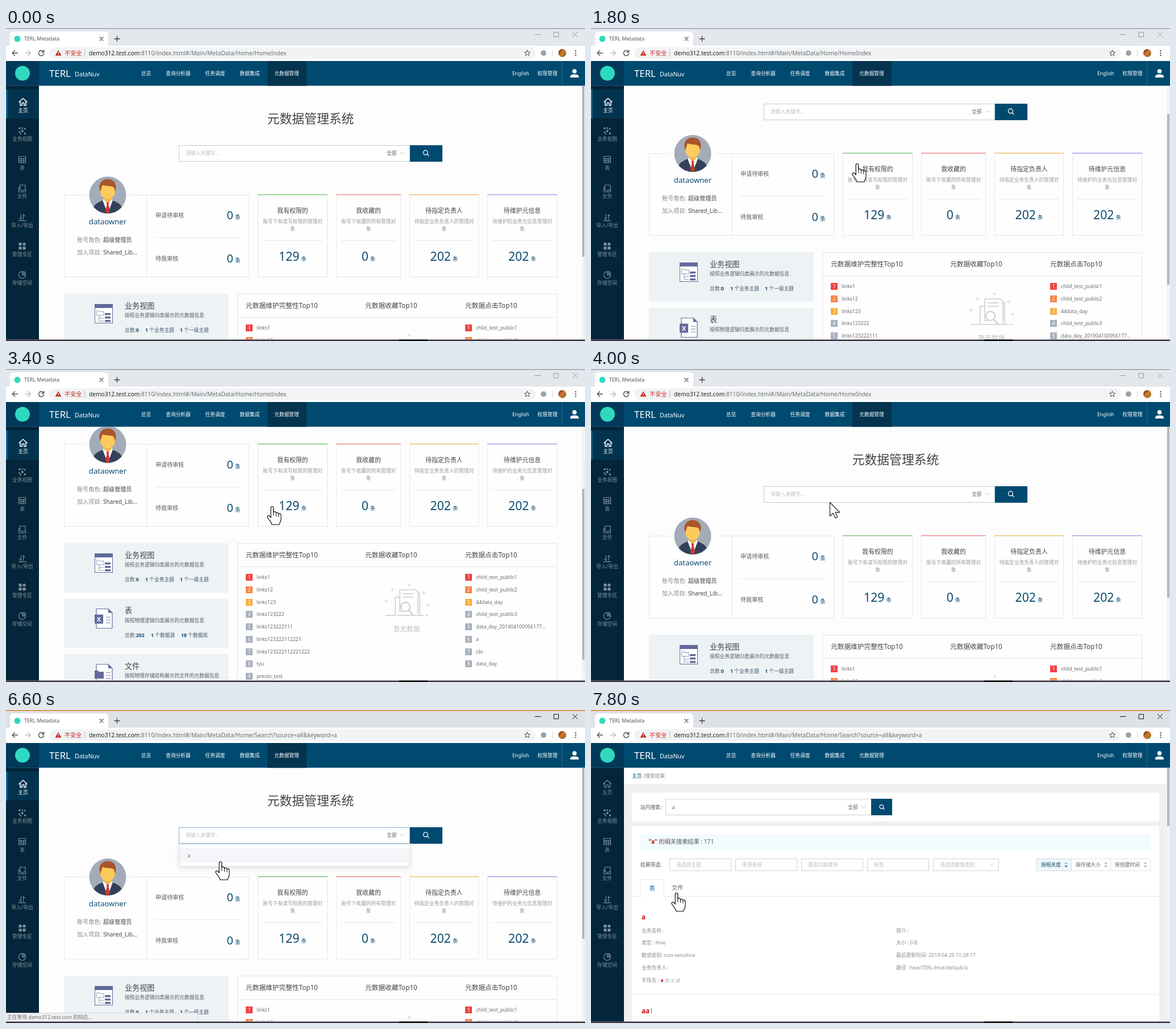
Write an HTML page with a canvas that moves like this. It is 1019x550 px and loops after 8 s.

```html
<!DOCTYPE html>
<html lang="zh-CN">
<head>
<meta charset="utf-8">
<title>Metadata</title>
<style>
html, body { margin: 0; width: 100%; height: 100%; overflow: hidden; background: #fff; }
canvas { display: block; width: 1019px; height: 550px; }
</style>
</head>
<body>
<canvas id="stage"></canvas>
<script>
const W = 1019, H = 550, LOOP = 8000, STEP = 100;
const canvas = document.getElementById('stage');
const ratio = window.devicePixelRatio || 1;
canvas.width = W * ratio;
canvas.height = H * ratio;
const g = canvas.getContext('2d');
g.scale(ratio, ratio);

const NAVY = '#004a70', DEEP = '#0b4a70', BRAND = '#2fd9c0', INK = '#444', GREY = '#999', LINE = '#e8e6e9';
const FONT = '"Noto Sans", "Noto Sans CJK SC", sans-serif';

// ---- drawing helpers ----
function text(s, x, cy, size, color, align = 'left', weight = 400) {
  g.font = `${weight} ${size}px ${FONT}`;
  g.textAlign = align;
  g.fillStyle = color;
  g.fillText(s, x, cy + size * 0.37);
  return x + g.measureText(s).width;
}
function runs(x, cy, size, parts) {
  for (const [s, color, weight] of parts) x = text(s, x, cy, size, color, 'left', weight);
}
function fill(x, y, w, h, color) {
  g.fillStyle = color;
  g.fillRect(x, y, w, h);
}
function frame(x, y, w, h, color, back) {
  if (back) fill(x, y, w, h, back);
  g.strokeStyle = color;
  g.lineWidth = 1;
  g.strokeRect(x + 0.5, y + 0.5, w - 1, h - 1);
}
function rounded(x, y, w, h, r, color) {
  g.beginPath();
  g.roundRect(x, y, w, h, r);
  g.fillStyle = color;
  g.fill();
}
function disc(x, y, r, color) {
  g.beginPath();
  g.arc(x, y, r, 0, Math.PI * 2);
  g.fillStyle = color;
  g.fill();
}
function icon(d, x, y, { stroke, back, width = 1 }) {
  const p = new Path2D(d);
  g.save();
  g.translate(x, y);
  g.lineJoin = g.lineCap = 'round';
  if (back) { g.fillStyle = back; g.fill(p); }
  if (stroke) { g.strokeStyle = stroke; g.lineWidth = width; g.stroke(p); }
  g.restore();
}
const chevron = (x, y) => icon('M-3.5-1.8L0 1.8L3.5-1.8', x, y, { stroke: '#c0c4cc' });
const lens = (x, y, s) => icon(`M${s} 0A${s} ${s} 0 1 1 ${-s} 0A${s} ${s} 0 1 1 ${s} 0M${s * 0.7} ${s * 0.7}L${s * 1.4} ${s * 1.4}`,
  x - 0.6, y - 0.6, { stroke: '#fff', width: 1.2 });

// ---- motion ----
const clamp = v => Math.max(0, Math.min(1, v));
const ramp = (t, a, b) => clamp((t - a) / (b - a));
const smooth = v => v * v * (3 - 2 * v);

const MOVES = [
  [200, 901, 62, 'arrow'], [500, 740, 120, 'arrow'], [800, 540, 185, 'arrow'], [1000, 468, 218, 'beam'],
  [1100, 468, 222, 'beam'], [1300, 468, 238, 'arrow'], [1600, 468, 238, 'hand'], [2100, 468, 238, 'hand'],
  [2200, 468, 241, 'hand'], [3900, 468, 241, 'hand'], [4000, 420, 234, 'arrow'], [4200, 360, 218, 'beam'],
  [4400, 312, 246, 'arrow'], [4800, 222, 302, 'arrow'], [4900, 235, 290, 'arrow'], [5200, 324, 218, 'beam'],
  [5500, 324, 218, 'beam'], [5800, 412, 220, 'beam'], [6000, 405, 244, 'hand'], [6200, 377, 266, 'hand'],
  [6700, 377, 266, 'arrow'], [7000, 380, 245, 'arrow'], [7200, 313, 243, 'arrow'], [7400, 228, 268, 'beam'],
  [7500, 193, 293, 'arrow'], [7700, 150, 321, 'hand'], [8000, 150, 321, 'hand']
];
function pointerAt(t) {
  let i = -1;
  while (i + 1 < MOVES.length && MOVES[i + 1][0] <= t) i++;
  if (i < 0) return null;
  const a = MOVES[i], b = MOVES[i + 1] || a;
  const k = b === a ? 0 : ramp(t, a[0], b[0]);
  return { x: a[1] + (b[1] - a[1]) * k, y: a[2] + (b[2] - a[2]) * k, kind: a[3] };
}
const scrollAt = t => Math.round(
  73 * smooth(ramp(t, 1250, 1800)) + 144 * smooth(ramp(t, 2100, 2500)) - 217 * smooth(ramp(t, 3300, 3600)));

// ---- browser window ----
function browser(active, searching) {
  const btn = active ? '#111' : '#999';
  fill(0, 0, W, 32, active ? '#dee1e6' : '#e4e7eb');
  fill(0, 0, W, 1.5, active ? '#d98227' : '#9aa3ae');
  rounded(7, 6, 173, 30, [6, 6, 0, 0], '#fff');
  fill(0, 31, W, 27, '#fff');
  disc(20, 19, 5.5, BRAND);
  text('TERL Metadata', 32, 19, 8.9, '#50545a');
  icon('M-3-3L3 3M3-3L-3 3', 168, 19, { stroke: '#4a4d51', width: 1.1 });
  icon('M-4.5 0H4.5M0-4.5V4.5', 195.5, 19, { stroke: '#3c4043', width: 1.3 });
  icon('M-5 0H5', 936, 11.5, { stroke: btn });
  icon('M-4-4H4V4H-4Z', 968.5, 11.5, { stroke: btn });
  icon('M-4-4L4 4M4-4L-4 4', 1001.5, 11.5, { stroke: btn });

  const back = 'M5 0H-4.5M0-4.5L-4.5 0L0 4.5';
  icon(back, 15.5, 44, { stroke: '#4b4f54', width: 1.4 });
  icon('M-5 0H4.5M0-4.5L4.5 0L0 4.5', 39, 44, { stroke: '#b9bcc0', width: 1.4 });
  icon('M3.5-3A4.6 4.6 0 1 0 4.6 1M4.6-5V-1.5H1', 62, 44, { stroke: '#4b4f54', width: 1.4 });
  rounded(76, 34, 856, 20, 10, '#f1f3f4');
  icon('M0-5L5.5 4.5H-5.5Z', 92, 44, { back: '#c9281f' });
  fill(91.5, 42, 1.2, 3.2, '#fff');
  fill(91.5, 46, 1.2, 1.2, '#fff');
  text('不安全', 103, 44, 10.2, '#c9281f');
  fill(138, 38, 1, 12, '#b5b9be');
  const page = searching ? 'Search?source=all&keyword=a' : 'HomeIndex';
  runs(146, 44, 10.2, [['demo312.test.com', '#202124'], [':8110/index.html#/Main/MetaData/Home/' + page, '#6a6e73']]);
  icon('M0-5L1.5-1.7L5-1.4L2.3.9L3.1 4.4L0 2.5L-3.1 4.4L-2.3.9L-5-1.4L-1.5-1.7Z', 917.5, 44, { stroke: '#4b4f54' });
  disc(946, 44, 4.8, '#9aa0a4');
  fill(961, 38, 1, 12, '#cdd0d4');
  const photo = g.createLinearGradient(972, 38, 986, 51);
  photo.addColorStop(0, '#3d2c1c');
  photo.addColorStop(0.45, '#e0742a');
  photo.addColorStop(1, '#4a7a32');
  disc(979, 44, 7, photo);
  for (const d of [-4, 0, 4]) disc(1002.5, 44 + d, 1.2, '#4b4f54');
}
function desktopEdge() {
  fill(0, 547.5, W, 2.5, '#39323f');
  fill(692, 547.5, 50, 2.5, '#0a0a0c');
}

// ---- application shell ----
const MENU = [
  ['主页', 'M-7 0L0-6.5L7 0M-5-1.5V6H-1.8V1.5H1.8V6H5V-1.5'],
  ['业务视图', 'M-6-6h3v3h-3zM-1-6h2.4v2.4h-2.4zM3.4-5h2.6v2.6h-2.6zM-1.5-1.5h3.5v3.5h-3.5zM-6 1h2.5v2.5h-2.5zM-4 4h2.5v2h-2.5zM3.4 3h3v3h-3z', 1],
  ['表', 'M-6-5.5H6V5.5H-6ZM-6-1.7H6M-6 2H6M-2-1.7V5.5M2-1.7V5.5'],
  ['文件', 'M-4-6H5.5V2.5H2.5L1.5 4H-.5L-1.5 2.5H-4ZM-4-2H-6V6H6V2.5'],
  ['导入/导出', 'M-2-5V4L-5 1M2 4V-5L5-2M-6.5 6H6.5'],
  ['管理专区', 'M-6-6h5v5h-5zM-6 1h5v5h-5zM1 1h5v5h-5zM3.5-6.8L6.8-3.5L3.5-.2L.2-3.5Z', 1],
  ['存储空间', 'M6 0A6 6 0 1 1 0-6V0ZM2-6A5 5 0 0 1 6-2H2Z']
];
function shell(home) {
  fill(0, 58, W, 43.5, NAVY);
  fill(0, 58, 58, 43.5, '#02395a');
  disc(29, 79.5, 13, BRAND);
  text('TERL', 76, 79.5, 16.8, '#fff');
  text('DataNuv', 121, 81.5, 10.6, '#fff');
  if (home) fill(460, 58, 69, 43.5, '#04344e');
  [['总览', 246.5], ['查询分析器', 303], ['任务调度', 368], ['数据集成', 429], ['元数据管理', 494]]
    .forEach(([s, x]) => text(s, x, 80, 8.75, '#fff', 'center', 500));
  text('English', 891, 80, 8.75, '#fff');
  text('权限管理', 935.5, 80, 8.75, '#fff', 'left', 500);
  fill(978, 58, 1, 43.5, '#2b6788');
  disc(1000.5, 76, 3.8, '#fff');
  icon('M-7.5 7V5.5C-7.5 2-3 1.5 0 1.5S7.5 2 7.5 5.5V7Z', 1000.5, 80, { back: '#fff' });

  fill(0, 101.5, 58, 446, '#04263a');
  if (home) {
    fill(0, 108, 58, 51, '#03344f');
    fill(0, 108, 2.5, 51, '#0b6d9f');
  }
  MENU.forEach(([label, d, solid], i) => {
    const on = home && i === 0, y = 130 + 50.65 * i, c = on ? '#fff' : '#81929d', x = on ? 30 : 28.5;
    icon(d, x, y, solid ? { back: c } : { stroke: c, width: on ? 1.5 : 1.1 });
    text(label, x, y + 14.3, 8.75, c, 'center', on ? 500 : 400);
  });
}
function scrollbar(y, h) {
  fill(1013, 101.5, 6, 446, '#f3f3f3');
  fill(1014, y, 4, h, '#b4b6b8');
}

// ---- home page ----
function portrait(x, y) {
  disc(x, y, 39, '#fdfdfd');
  g.save();
  g.beginPath();
  g.arc(x, y, 32.5, 0, Math.PI * 2);
  g.clip();
  fill(x - 33, y - 33, 66, 66, '#a3abb9');
  icon('M-27 36C-27 18-22 15-8 9H8C22 15 27 18 27 36Z', x, y, { back: '#33425a' });
  icon('M-9 9L0 33L9 9L4 5H-4Z', x, y, { back: '#fff' });
  icon('M-6 0H6V9L0 14L-6 9Z', x, y, { back: '#f0b548' });
  icon('M-2.5 13H2.5L1.5 17L4 28L0 34L-4 28L-1.5 17Z', x, y, { back: '#d4352f' });
  icon('M-13-10C-13-24 13-24 13-10V-6C13 3 5 7 0 7S-13 3-13-6Z', x, y, { back: '#fccb5c' });
  icon('M-13-6C-18-20-10-28 0-28S18-20 13-6L11-13C8-17-6-15-9-18Z', x, y, { back: '#a9552b' });
  g.restore();
}
const STATS = [
  [443, 123, '我有权限的', '账号下有读写权限的管理对', '129', '#8fd08a'],
  [581, 114, '我收藏的', '账号下收藏的所有管理对', '0', '#f29a9a'],
  [710, 122, '待指定负责人', '待指定业务负责人的管理对', '202', '#f3cd7d'],
  [847, 123, '待维护元信息', '待维护的业务元信息管理对', '202', '#b9a9ee']
];
function stat([x, w, title, note, count, color]) {
  const c = x + w / 2;
  frame(x, 293, w, 145, LINE, '#fefefe');
  fill(x, 292, w, 1.6, color);
  text(title, c, 321, 10.9, INK, 'center');
  text(note, c, 340, 8.75, GREY, 'center');
  text('象', c, 352.5, 8.75, GREY, 'center');
  fill(x + 8, 373, w - 16, 1, LINE);
  g.font = `21.2px ${FONT}`;
  const left = c - (g.measureText(count).width + 12.5) / 2;
  const end = text(count, left, 401, 21.2, DEEP);
  text('条', end + 3, 405, 9.5, DEEP);
}
const PAPER = 'M-13-17H8L15-10V17H-13Z';
const GROUPS = [
  ['业务视图', '按照业务逻辑归类展示的元数据信息', [['0', '', 209], ['1', '个业务主题', 245], ['1', '个一级主题', 306]]],
  ['表', '按照物理逻辑归类展示的元数据信息', [['202', '', 209], ['1', '个数据源', 255], ['18', '个数据库', 308]]],
  ['文件', '按照物理存储结构展示的文件的元数据信息', [['0', '', 209], ['0', '个数据源', 245]]]
];
function group([title, note, counts], i) {
  const y = 467 + 97.5 * i, ix = 172, iy = y + 35, c = '#626a9c';
  fill(102, y, 290, 87, '#edf2f5');
  if (i === 0) {
    frame(156, y + 18, 32, 34, c, '#fff');
    fill(156, y + 18, 32, 7, c);
    icon('M-12-5H-7L-6-3.5H0V3H-12ZM-8 3V13H0M-8 8H0', ix, iy, { stroke: '#9097b8' });
    for (const d of [-1, 5, 11]) fill(ix + 2, iy + d, 10, 3.5, c);
  } else {
    icon(PAPER, ix, iy, { stroke: c, back: '#fff', width: 1.2 });
    icon('M8-17V-10H15Z', ix, iy, { back: c });
    for (const d of [-3, 2, 7]) fill(ix + 4, iy + d, 8, 1.2, '#9097b8');
    if (i === 1) {
      fill(156, iy - 7, 15, 16, c);
      text('X', 163.5, iy + 1, 11, '#fff', 'center', 700);
    } else icon('M-16-6H-10L-8-4H0V8H-16Z', ix, iy, { back: c });
  }
  text(title, 209, y + 21, 13.1, INK);
  text(note, 209, y + 38, 8.75, '#565b64');
  counts.forEach(([n, label, x], k) => runs(x, y + 64, 8.75, k
    ? [[n, DEEP, 700], [' ' + label, '#45566a']] : [['总数:', '#565b64'], [n, DEEP, 700]]));
}
const LINKS = ['links1', 'links12', 'links123', 'links123222', 'links123222111', 'links123222112221',
  'links123222112221222', 'tyu', 'presto_test', 'tyu_pro'];
const CLICKS = ['child_test_public1', 'child_test_public2', '44data_day', 'child_test_public3',
  'data_day_201904100956177...', 'a', 'cbr', 'data_day'];
function ranking(items, x) {
  items.forEach((s, i) => {
    const y = 527 + 21.75 * i;
    fill(x, Math.round(y - 6), 12, 12, ['#f24343', '#f78446', '#fbad3c'][i] || '#a6b0be');
    text(i + 1, x + 6, y, 8.2, '#fff', 'center');
    text(s, x + 19, y, 8.75, '#6b6b6b');
  });
}
function emptyNote(x, y) {
  const stroke = '#c9cbce';
  icon('M-37 25H-21M-17 25H30M34 25H37M-20 25V-7H-13M-12 18V-20H16L20-16V22M-8 18H-12M-7-13H12M-7-7H12M20-14H23V24',
    x, y, { stroke, width: 1.5 });
  icon('M6 10A8 8 0 1 1-10 10A8 8 0 1 1 6 10M4 16L11 24', x, y, { stroke, back: '#fff', width: 2 });
  for (const [dx, dy] of [[-36, 0], [-25, -20], [5, -29], [30, -15], [37, 7]]) {
    g.beginPath();
    g.arc(x + dx, y + dy, 1.7, 0, 7);
    g.strokeStyle = stroke;
    g.lineWidth = 1;
    g.stroke();
  }
  text('暂无数据', x, y + 48.5, 11.7, '#bdbfc2', 'center');
}
function suggestions(open) {
  if (!open) return;
  g.save();
  g.globalAlpha = open;
  g.translate(0, 235);
  g.scale(1, 0.5 + open / 2);
  g.shadowColor = 'rgba(0,0,0,.13)';
  g.shadowBlur = 8;
  g.shadowOffsetY = 2;
  fill(305, 1, 406, 39, '#fff');
  g.shadowColor = 'transparent';
  frame(305, 1, 406, 39, '#e4e7ed');
  fill(306, 7, 404, 26, '#f4f6f9');
  text('a', 319.5, 21, 8.75, '#606266');
  g.restore();
}
function homePage(scroll, open) {
  g.save();
  g.beginPath();
  g.rect(58, 101.5, 955, 446);
  g.clip();
  fill(58, 101, 955, 447, '#fdfdfd');
  g.translate(0, -scroll);
  text('元数据管理系统', 536, 158.5, 21.8, INK, 'center');
  frame(304, 206, 407, 29, open ? '#8aaccb' : '#bccddc', '#fff');
  text('请输入关键字...', 316, 220, 8.75, '#b9bdc5');
  text('全部', 670, 220, 8.75, '#606266');
  chevron(697.5, 220);
  fill(711, 206, 57, 29, NAVY);
  lens(739, 219.5, 4);

  frame(102, 293, 326, 145, LINE, '#fefefe');
  fill(247, 293, 1, 144, LINE);
  portrait(179, 293.5);
  text('dataowner', 179, 340, 13.1, DEEP, 'center');
  [['账号角色:', '超级管理员', 372], ['加入项目:', 'Shared_Lib...', 394]].forEach(([k, v, y]) => {
    text(k, 125, y, 10.1, '#8a8a8a');
    text(v, 171, y, 10.1, INK);
  });
  [['申请待审核', 329.5], ['待我审核', 405]].forEach(([s, y]) => {
    text(s, 263, y, 10.1, '#5a5a5a');
    text('0', 388.5, y - 0.5, 20, DEEP);
    text('条', 403, y + 3, 9.8, DEEP);
  });
  fill(263, 368, 150, 1, LINE);
  STATS.forEach(stat);
  GROUPS.forEach(group);

  frame(407, 467, 563, 283, '#e4e4e5', '#fefefe');
  fill(407, 508, 563, 1, '#e4e4e5');
  [['元数据维护完整性', 422], ['元数据收藏', 632], ['元数据点击', 808]]
    .forEach(([s, x]) => text(s + 'Top10', x, 488, 11.7, INK));
  ranking(LINKS, 422);
  ranking(CLICKS, 808);
  emptyNote(705, 569);
  suggestions(open);
  g.restore();
  scrollbar(102 + scroll * 0.675, 300);
}

// ---- search results ----
function resultsPage() {
  const red = '#cc0a0a', hint = '#b9bdc6', edge = '#ccd4de', soft = '#8c8c8c';
  fill(58, 101.5, 955, 446, '#eff0f1');
  fill(58, 101.5, 955, 29, '#fff');
  runs(72, 116, 8.75, [['主页', DEEP], [' /搜索结果', '#8a8a8a']]);
  fill(72, 145, 928, 51, '#fff');
  text('站内搜索:', 87, 170.5, 8.75, '#555');
  frame(131, 156, 363, 29, edge, '#fff');
  text('a', 142.5, 170.5, 8.75, '#606266');
  text('全部', 452, 170.5, 8.75, '#606266');
  chevron(479.5, 170.5);
  fill(493, 156, 37, 29, NAVY);
  lens(512, 170.5, 3.4);

  fill(72, 204, 928, 344, '#fff');
  fill(87, 219, 898, 28, '#f1fafc');
  runs(101.5, 231.5, 10.2, [['"a"', red, 700], [' 的相关搜索结果 : 171', '#555']]);
  text('结果筛选:', 87, 272, 8.75, '#555');
  [['请选择主题', 109], ['来源系统', 109], ['源表功能模块', 109], ['标签', 109], ['请选择敏感类别', 116]].forEach(([s, w], i) => {
    const x = 138 + 116 * i;
    frame(x, 261, w, 22, edge, '#fff');
    text(s, x + 12, 272, 8.75, hint);
  });
  chevron(705.5, 272);

  frame(784, 261, 201, 22, '#dde2e8', '#fff');
  frame(784, 261, 62, 22, '#c7dbe6', '#f0f7fa');
  fill(914, 261, 1, 22, '#dde2e8');
  [['按相关度', 792, 836], ['按存储大小', 853, 906], ['按创建时间', 922, 975.5]].forEach(([s, x, ax], i) => {
    text(s, x, 272, 8.75, i ? '#606266' : DEEP);
    icon('M-3-1.5L0-4.5L3-1.5Z', ax, 272, { back: '#a9adb5' });
    icon('M-3 1.5L0 4.5L3 1.5Z', ax, 272, { back: i ? '#a9adb5' : '#1f7fb0' });
  });

  fill(72, 327, 928, 1, '#e3e6ea');
  icon('M0 30V3Q0 0 3 0H38Q41 0 41 3V30', 87, 298, { stroke: '#e0e4e9', back: '#fff' });
  text('表', 107.5, 313, 10.2, '#0f6a98', 'center');
  text('文件', 152, 312.5, 10.2, '#666', 'center');

  text('a', 89, 363.5, 11.6, red, 'left', 700);
  const rows = [
    ['业务名称 :', '简介 :'],
    ['类型 : Hive', '大小 : 0 B'],
    ['敏感类别: non-sensitive', '最后更新时间: 2019-04-25 11:28:17'],
    ['业务负责人:', '路径 : hive/TERL-Hive/default/a']
  ];
  rows.forEach(([a, b], i) => {
    const y = 387.5 + 21.75 * i;
    text(a, 89, y, 8.75, soft);
    text(b, 537, y, 8.75, soft);
  });
  runs(89, 474.5, 8.75, [['字段名 : ', soft], ['a', red, 700], [' ;b ;c ;d', soft]]);
  fill(72, 499, 928, 1, '#ebedf0');
  runs(89, 528.5, 11.6, [['aa', red, 700], ['1', '#2f80d8']]);
  scrollbar(102, 102);
}
function loading(t) {
  const alpha = 0.9 * (1 - ramp(t, 6790, 7080));
  if (alpha <= 0) return;
  fill(0, 58, 1019, 489.5, `rgba(255,255,255,${alpha})`);
  g.save();
  g.globalAlpha = alpha / 0.9;
  g.beginPath();
  const turn = Math.PI + (t - 7000) / 320;
  g.arc(509.5, 303.5, 14.5, turn - 1.1, turn + 1.1);
  g.strokeStyle = '#9fb0bc';
  g.lineWidth = 1.6;
  g.stroke();
  g.restore();
}
function statusBubble(alpha) {
  if (alpha <= 0) return;
  g.save();
  g.globalAlpha = alpha;
  frame(-1, 532, 339, 17, '#d2d5d9', '#eff0f2');
  text('正在等待 demo312.test.com 的响应...', 2, 540, 8.75, '#6a6d70');
  g.restore();
}

// ---- pointer ----
const POINTERS = {
  arrow: ['M0 0V24L5.6 18.8L9.4 27.4L13.2 25.7L9.5 17.4H17.4Z', 1.1],
  hand: ['M-2.3 2C-2.3-.6 2.3-.6 2.3 2V11C3-.0 0 9 4 9.2C6 9.2 7 10.5 7 12C8 10 11 10.4 11.4 13C13 11.6 15.5 12.5 15.5 15.5V22C15.5 27 13 28 12.4 32H-.6C-1 28-5 24.5-8.2 19.5C-9.6 17-6.5 15-4.6 17L-2.3 19.5Z', 1.2]
};
function pointer(p) {
  if (!p) return;
  const x = Math.round(p.x) + 0.5, y = Math.round(p.y) + 0.5;
  if (p.kind === 'beam') {
    icon('M-4-11H-1L0-10L1-11H4M0-10V10M-4 11H-1L0 10L1 11H4', x, y, { stroke: '#222', width: 1.1 });
    return;
  }
  const [d, width] = POINTERS[p.kind];
  icon(d, x, y, { stroke: '#111', back: '#fff', width });
  if (p.kind === 'hand') icon('M2.3 10V16M7 12V17M11.4 13V18', x, y, { stroke: '#111' });
}

function draw(t) {
  const home = t < 6700;
  fill(0, 0, W, H, '#fff');
  if (home) homePage(scrollAt(t), ramp(t, 5100, 5400));
  else resultsPage();
  shell(home);
  if (!home) loading(t);
  statusBubble(t < 6400 ? 0 : 1 - ramp(t, 6750, 7050));
  browser(t >= 5000, t >= 6400);
  desktopEdge();
  pointer(pointerAt(t));
}

let shown = -1;
const start = performance.now();
function tick() {
  const now = (performance.now() - start) % LOOP;
  const t = Math.floor(now / STEP) * STEP;
  if (t !== shown) draw(shown = t);
  requestAnimationFrame(tick);
}
tick();
</script>
</body>
</html>
```
